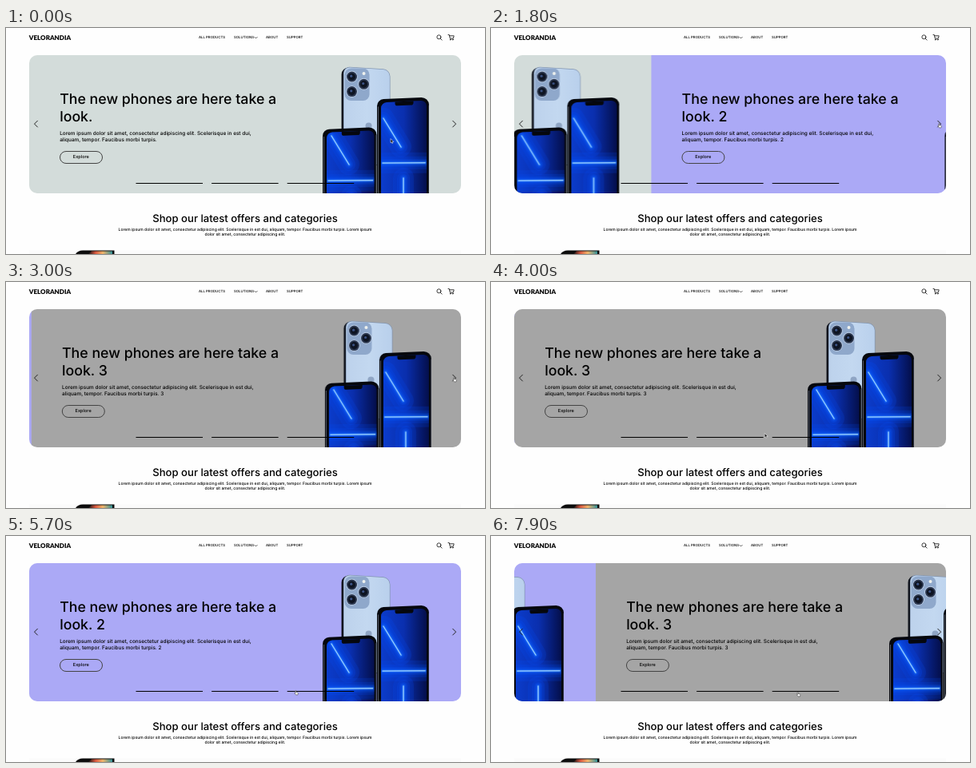
An HTML page with a canvas for the animation above (8 s loop, 599 by 283 pixels).

```html
<!DOCTYPE html>
<html lang="en">
<head>
<meta charset="utf-8">
<title>Shop carousel</title>
<style>
  html, body { margin: 0; width: 100%; height: 100%; overflow: hidden; background: #fefefe; }
  #stage { position: relative; width: 599px; height: 283px; overflow: hidden; color: #000;
    font-family: Inter, "Open Sans", sans-serif; font-weight: 500; text-rendering: geometricPrecision; }
  #stage * { position: absolute; }
  .label { white-space: pre; line-height: 0; }
  .center { left: 0; width: 598px; text-align: center; }
  .logo { font-family: Lato, sans-serif; font-weight: 900; }
  #view { left: 29px; top: 33.5px; width: 540px; height: 173.5px; border-radius: 10px; overflow: hidden; }
  #track { left: 0; top: 0; width: 1620px; height: 174px; }
  .slide { top: 0; width: 541px; height: 174px; }
  .slide canvas { left: 360px; top: 0; width: 150px; height: 174px; }
  svg { left: 0; top: 0; overflow: visible; }
</style>
</head>
<body>
<div id="stage">
  <div id="view"><div id="track"></div></div>
  <svg width="599" height="283" fill="none" stroke="#222" stroke-linecap="round" stroke-linejoin="round">
    <defs>
      <linearGradient id="hues">
        <stop offset="0" stop-color="#111"/><stop offset=".3" stop-color="#d9573f"/>
        <stop offset=".6" stop-color="#f0b46a"/><stop offset="1" stop-color="#2f8f96"/>
      </linearGradient>
    </defs>
    <path d="M310.8 11.3l1.7 1.7 1.7-1.7" stroke-width=".7"/>
    <g stroke-width=".9">
      <circle cx="541.4" cy="11.3" r="2.5"/><path d="M543.3 13.2l1.9 1.9"/>
      <path d="M553 8.5h1.3l1 4.6h4l.9-3.3h-5.5"/>
      <circle cx="555.8" cy="14.6" r=".5"/><circle cx="558.8" cy="14.6" r=".5"/>
    </g>
    <path d="M39.4 116.2l-3.9 3.9 3.9 3.9M558.7 116.2l3.9 3.9-3.9 3.9"/>
    <path d="M162.5 194.5h273" stroke="#000" stroke-linecap="butt" stroke-dasharray="83.5 11.1"/>
    <g stroke="none">
      <path d="M29 278.5h540v5H29z" fill="#fbfbfb"/>
      <path d="M87 283q3-4.2 9-4.4h39.5v4.4z" fill="#0c0c0c"/>
      <path d="M103 283l4-3.6h26v3.6z" fill="url(#hues)"/>
    </g>
    <g id="cursor" stroke-width=".5">
      <path id="arrow" d="M0 0v4.8l1.1-1 .8 1.8.9-.4-.8-1.7h1.5z" fill="#111" stroke="#fff"/>
      <path id="hand" d="M.2.8q.5-.9 1 0v1.8l2.1.5q.7.3.5 1.1l-.4 1.7H1L-.7 3.7q.2-.6.9-.2z" fill="#fff"/>
    </g>
  </svg>
</div>
<script>
const $ = id => document.getElementById(id);
const stage = $('stage'), track = $('track');
const LOOP = 8000, STEP = 100, SLIDE_TIME = 500, GLIDE = 700, WIDTH = 540;
const LOREM = 'Lorem ipsum dolor sit amet, consectetur adipiscing elit.';

function add(parent, tag, cls = '') {
  const el = document.createElement(tag);
  el.className = cls;
  parent.appendChild(el);
  return el;
}

// y is the baseline; x is null for centred text
function label(parent, text, x, y, size, cls = '') {
  const el = add(parent, 'div', 'label ' + cls);
  el.textContent = text;
  if (x === null) el.classList.add('center');
  else el.style.left = x + 'px';
  el.style.top = y - 0.364 * size + 'px';
  el.style.fontSize = size + 'px';
}

function box(c, x, y, w, h, r, fill) {
  c.beginPath();
  c.roundRect(x, y, w, h, r);
  c.fillStyle = fill;
  c.fill();
}

function dot(c, x, y, r, fill) {
  c.beginPath();
  c.arc(x, y, r, 0, Math.PI * 2);
  c.fillStyle = fill;
  c.fill();
}

function blend(c, x0, x1, ...stops) {
  const g = c.createLinearGradient(x0, 0, x1, 0);
  stops.forEach((s, i) => g.addColorStop(i / (stops.length - 1), s));
  return g;
}

// shear vertically around x, so that tops slope
function tilted(c, slope, x, paint) {
  c.save();
  c.transform(1, slope, 0, 1, 0, -slope * x);
  paint();
  c.restore();
}

// light ray: wide and blue outside, thin and pale inside
function beam(c, x0, y0, x1, y1) {
  c.beginPath();
  c.moveTo(x0, y0);
  c.lineTo(x1, y1);
  for (let w = 26; w > 0.7; w *= 0.62) {
    const k = 1 / w;
    c.lineWidth = w;
    c.strokeStyle = `hsla(${222 - 18 * k}, 100%, ${48 + 36 * k}%, ${0.14 + 0.6 * k})`;
    c.stroke();
  }
}

// cx, cy is where the rays meet
function frontPhone(c, x, y, w, cx, cy) {
  const h = 240 - y, sx = x + 5, sw = w - 8;
  tilted(c, -0.045, x + w, () => {
    box(c, x, y, w, h, [8, 10, 0, 0], '#05070d');
    box(c, x + 1, y + 9, 0.8, h, 0, '#6a7180');
    box(c, x + w - 1, y + 10, 0.6, h, 0, '#4a5060');
    c.save();
    box(c, sx, y + 4, sw, h, [7, 7, 0, 0], blend(c, sx, sx + sw, '#0b3ccb', '#0a2fae', '#040f4c'));
    c.clip();
  });
}

function phone(c, x, y, w, cx, cy) {
  const h = 240 - y, sx = x + 5, sw = w - 8;
  c.save();
  c.transform(1, -0.045, 0, 1, 0, 0.045 * (x + w));
  box(c, x, y, w, h, [8, 10, 0, 0], '#05070d');
  box(c, x + 1, y + 9, 0.8, h, 0, '#6a7180');
  box(c, x + w - 1, y + 10, 0.6, h, 0, '#4a5060');
  box(c, sx, y + 4, sw, h, [7, 7, 0, 0], blend(c, sx, sx + sw, '#0b3ccb', '#0a2fae', '#040f4c'));
  c.clip();
  c.lineCap = 'round';
  beam(c, cx - 25, cy - 56, cx - 3, cy - 19);
  beam(c, sx + 2, cy, sx + sw - 2, cy + 2);
  beam(c, cx, cy + 20, cx, cy + 60);
  box(c, x + w / 2 - 10, y + 3, 23, 6, [0, 0, 3, 3], '#05070d');
  c.restore();
}

function drawPhones(c) {
  tilted(c, 0.06, 424, () => {
    box(c, 419.5, 49, 55, 120, [9, 8, 0, 0], '#10141d');
    box(c, 422, 47.8, 58.5, 120, [8, 9, 0, 0], '#8094b0');
    box(c, 422.6, 48.6, 57.2, 120, [8, 8, 0, 0], blend(c, 423, 480, '#bdd2ec', '#c3d8f0', '#b9d0ec'));
  });
  box(c, 423.5, 50, 31, 40.5, 8, '#8fa8cb');
  [0, 1, 2].forEach(i => {
    const x = 432.5 + 15 * (i % 2), y = 60.5 + 9.3 * i;
    dot(c, x, y, 7.2, '#c9d9ef');
    dot(c, x, y, 6.5, '#2b374f');
    dot(c, x, y, 4.6, '#0e1422');
    dot(c, x - 0.8, y - 0.8, 1.6, '#3d5486');
  });
  dot(c, 447.5, 56.5, 2, '#eef1ee');
  dot(c, 453.5, 122, 4, '#8fa5c4');
  phone(c, 396, 123.5, 67.5, 432, 188);
  phone(c, 464, 86, 65, 497, 166);
}

function makeSlide(index, color) {
  const slide = add(track, 'div', 'slide'), x = 38.2;
  const tail = index ? ' ' + (index + 1) : '';
  slide.style.left = index * WIDTH + 'px';
  slide.style.background = color;
  label(slide, 'The new phones are here take a', x, 63.2, 17.75);
  label(slide, 'look.' + tail, x, 85.2, 17.75);
  label(slide, LOREM + ' Scelerisque in est dui,', x, 101.2, 6.45);
  label(slide, 'aliquam, tempor. Faucibus morbi turpis.' + tail, x, 109.2, 6.45);
  label(slide, 'Explore', 54.8, 130.8, 5.6);

  const canvas = add(slide, 'canvas'), scale = window.devicePixelRatio || 1;
  canvas.width = 150 * scale;
  canvas.height = 174 * scale;
  const c = canvas.getContext('2d');
  c.scale(scale, scale);
  c.translate(-389, -33.5);
  drawPhones(c);

  const button = add(slide, 'div');
  button.style.cssText = 'left:38px;top:120px;width:52px;height:14.5px;border:.7px solid #444;border-radius:9px';
}

['#d3dcda', '#aba9f6', '#a5a5a5'].forEach((color, i) => makeSlide(i, color));

label(stage, 'VELORANDIA', 28.8, 15, 8, 'logo');
[['ALL PRODUCTS', 241], ['SOLUTIONS', 285], ['ABOUT', 325], ['SUPPORT', 351]]
  .forEach(([text, x]) => label(stage, text, x, 14.6, 4.32));
label(stage, 'Shop our latest offers and categories', null, 244, 13.1);
label(stage, LOREM + ' Scelerisque in est dui, aliquam, tempor. Faucibus morbi turpis. Lorem ipsum', null, 255, 5.05);
label(stage, 'dolor sit amet, consectetur adipiscing elit.', null, 261, 5.05);

// time of the click, slide to show
const clicks = [[1600, 1], [2548, 2], [4533, 1], [6649, 0], [7584, 2]];

// time of arrival, place
const stops = [[0, 481, 139], [800, 559.5, 119], [4100, 329.5, 194], [5500, 361.5, 193], [6650, 225, 194], [7000, 383, 195]];

// cubic-bezier(.25, .1, .25, 1)
function ease(p) {
  if (p <= 0) return 0;
  if (p >= 1) return 1;
  const curve = (s, a, b) => 3 * a * s * (1 - s) ** 2 + 3 * b * s * s * (1 - s) + s ** 3;
  let lo = 0, hi = 1;
  for (let i = 0; i < 24; i++) {
    const mid = (lo + hi) / 2;
    if (curve(mid, 0.25, 0.25) < p) lo = mid; else hi = mid;
  }
  return curve(lo, 0.1, 1);
}

function draw(t) {
  let pos = 0;
  for (const [start, to] of clicks) pos += (to - pos) * ease((t - start) / SLIDE_TIME);
  track.style.transform = `translateX(${-pos * WIDTH}px)`;

  let [last, x, y] = stops[0], moving = t < GLIDE;
  for (const [time, toX, toY] of stops.slice(1)) {
    const start = Math.max(last, time - GLIDE);
    const p = Math.min(1, Math.max(0, (t - start) / (time - start))), k = p * p * (3 - 2 * p);
    x += (toX - x) * k;
    y += (toY - y) * k;
    if (p > 0) moving = p < 1;
    last = time;
  }
  $('cursor').setAttribute('transform', `translate(${x} ${y})`);
  $('hand').style.display = moving ? 'none' : '';
  $('arrow').style.display = moving ? '' : 'none';
}

let begin;
function tick(now) {
  begin ??= now;
  draw(Math.floor(((now - begin) % LOOP) / STEP) * STEP);
  requestAnimationFrame(tick);
}
draw(0);
requestAnimationFrame(tick);
</script>
</body>
</html>
```
